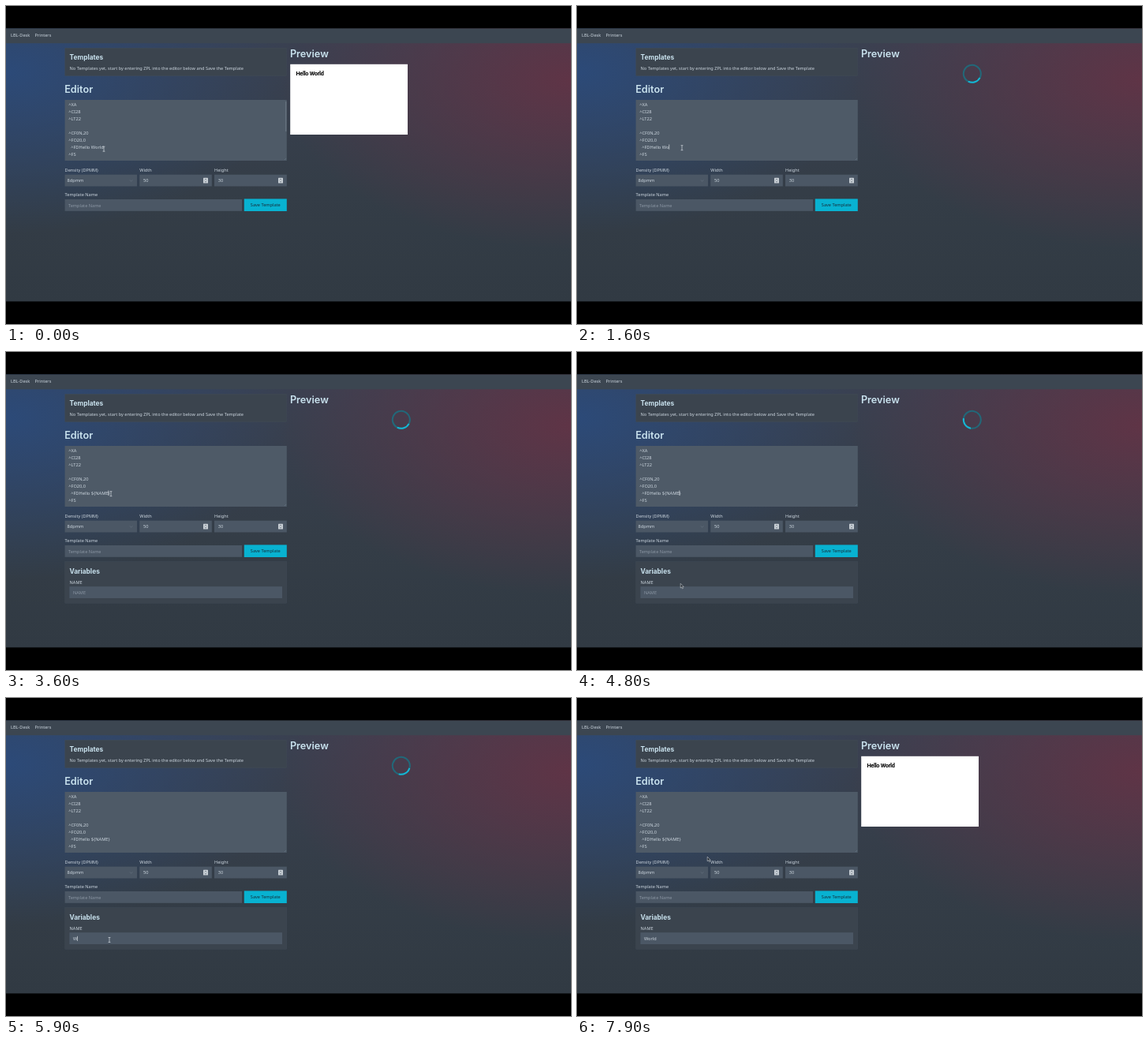
An HTML page that plays this animation: 716x403 px, repeating every 8000 ms.

```html
<!DOCTYPE html>
<html lang="en">
<head>
<meta charset="utf-8">
<title>Label editor</title>
<style>
  html, body { margin: 0; height: 100%; overflow: hidden; background: #000; }
  svg { display: block; width: 100%; height: 100%; }
  text { font: 5.6px "Noto Sans", sans-serif; fill: #cbd5de; white-space: pre; }
  .h1, .h2 { font-family: Inter, sans-serif; font-weight: 600; fill: #c9e2ee; }
  .h1 { font-size: 12.7px; }
  .h2 { font-size: 8.4px; font-weight: 700; }
  .code { font-size: 5.7px; }
  .hint { fill: #8a96a3; }
  .label { font: 700 7.4px Roboto, sans-serif; letter-spacing: -.3px; fill: #000; }
  .field { fill: #4b5765; }
  .card { fill: #3b444e; stroke: #434d58; stroke-width: .4; }
  .line { fill: none; stroke-width: .6; }
</style>
</head>
<body>
<svg viewBox="0 0 716 403">
  <defs>
    <linearGradient id="base" x2="0" y2="1">
      <stop stop-color="#3a4152"/>
      <stop offset=".6" stop-color="#343d47"/>
      <stop offset="1" stop-color="#313a43"/>
    </linearGradient>
    <radialGradient id="blue" gradientUnits="userSpaceOnUse" cx="0" cy="0" r="1"
      gradientTransform="translate(0 55) scale(360 205)">
      <stop stop-color="#2c4a78"/>
      <stop offset="1" stop-color="#2c4a78" stop-opacity="0"/>
    </radialGradient>
    <radialGradient id="red" gradientUnits="userSpaceOnUse" cx="0" cy="0" r="1"
      gradientTransform="translate(716 65) scale(370 215)">
      <stop stop-color="#5f3446"/>
      <stop offset="1" stop-color="#5f3446" stop-opacity="0"/>
    </radialGradient>
    <g id="stepper">
      <rect x="-3" y="-3.4" width="6" height="6.8" rx=".6" fill="#c9d0d6"/>
      <path class="line" stroke="#4b5765" d="M-1.3-.8 0-2 1.3-.8M-1.3.8 0 2 1.3.8"/>
    </g>
  </defs>

  <g transform="translate(0 28.6)">
    <rect width="716" height="345.8" fill="url(#base)"/>
    <rect width="716" height="345.8" fill="url(#blue)"/>
    <rect width="716" height="345.8" fill="url(#red)"/>
    <rect width="716" height="18.6" fill="#3c4651"/>
  </g>
  <text x="6" y="39">LBL-Desk</text>
  <text x="36.6" y="39">Printers</text>

  <rect class="card" x="74.8" y="53.3" width="281" height="35.2"/>
  <text class="h2" x="80.6" y="68.2">Templates</text>
  <text x="80.6" y="80.8">No Templates yet, start by entering ZPL into the editor below and Save the Template</text>

  <text class="h1" x="74.2" y="109.8">Editor</text>
  <rect class="field" x="74.6" y="119" width="281.2" height="77" style="fill:#4e5a67"/>
  <path class="line" stroke="#6d7986" d="M353 195 355 193"/>
  <path id="scrollbar" class="line" stroke="#8893a0" d="M354.8 121V159"/>
  <g id="code"></g>
  <text id="edit" class="code" x="79.2" y="180.5"></text>

  <text x="74.6" y="210">Density (DPMM)</text>
  <text x="169.2" y="210">Width</text>
  <text x="264" y="210">Height</text>
  <rect class="field" x="74.6" y="213.7" width="91.4" height="14.8"/>
  <rect class="field" x="169.2" y="213.7" width="91.6" height="14.8"/>
  <rect class="field" x="264" y="213.7" width="91.8" height="14.8"/>
  <text x="77.6" y="223.2">8dpmm</text>
  <text x="174" y="223.2">50</text>
  <text x="268.8" y="223.2">30</text>
  <path class="line" stroke="#6c7885" d="M156.8 220.5 158.6 222.2 160.4 220.5"/>
  <use href="#stepper" x="253" y="221.2"/>
  <use href="#stepper" x="348" y="221.2"/>

  <text x="74.6" y="241.3">Template Name</text>
  <rect class="field" x="74.6" y="245" width="224.4" height="14.8"/>
  <text class="hint" x="79" y="254.6">Template Name</text>
  <rect x="301.8" y="244.4" width="54" height="15.6" fill="#08b2d1"/>
  <text x="328.8" y="254.3" text-anchor="middle" style="fill:#16303d">Save Template</text>

  <g id="vars">
    <rect class="card" x="74.8" y="265.6" width="281" height="52.6"/>
    <text class="h2" x="80.4" y="280.9">Variables</text>
    <text id="varName" x="80.6" y="293.6"></text>
    <rect class="field" x="80.4" y="297.2" width="269.6" height="14.8"/>
    <text id="value" x="85" y="306.8"></text>
  </g>

  <text class="h1" x="359.9" y="65.3">Preview</text>
  <g id="preview">
    <rect x="360.2" y="73.8" width="148.8" height="89.2" fill="#fff"/>
    <text id="printed" class="label" x="367.4" y="87.8"></text>
  </g>
  <g id="spinner" fill="none" stroke-width="2">
    <circle r="11" stroke="#226879"/>
    <path stroke="#16b6d3" d="M7.78-7.78A11 11 0 0 1 7.78 7.78"/>
  </g>

  <path id="caret" class="line" stroke="#f0f4f7" d="M0-5V1.2"/>
  <path id="beam" class="line" stroke="#e8edf1" d="M-1.4-3H1.4M0-3V3M-1.4 3H1.4"/>
  <path id="arrow" fill="#20272e" stroke="#e8edf1" stroke-width=".5"
    d="M0 0V5.6L1.3 4.4 2.3 6.5 3.2 6.1 2.3 4.1H4Z"/>
</svg>

<script>
const $ = id => document.getElementById(id);
const LOOP = 8000;

['^XA', '^CI28', '^LT22', '', '^CF0N,20', '^FO20,0', '', '^FS'].forEach((s, i) => {
  const line = $('edit').cloneNode();
  line.removeAttribute('id');
  line.setAttribute('y', 126.5 + 9 * i);
  line.textContent = s;
  $('code').append(line);
});

// [time, text before the caret, text after it]
const edits = [
  [200, 'World', ''], [1400, 'Worl', ''], [1500, 'Wor', ''], [1600, 'Wo', ''],
  [1700, 'W', ''], [1800, '', ''], [2000, '$', ''], [2200, '${', ''],
  [2350, '${}', ''], [2700, '${', '}'], [3000, '${N', '}'], [3150, '${NA', '}'],
  [3350, '${NAM', '}'], [3550, '${NAME', '}']
];
const entries = [[5300, ''], [5800, 'W'], [6000, 'Wo'], [6200, 'Wor'], [6400, 'Worl'], [6600, 'World']];

// [start, end, x, y]: the mouse glides to x, y
const moves = [[0, 0, 124, 181.2], [50, 700, 133, 179.7], [4000, 5000, 131, 306.5], [7500, 7900, 165.2, 201.2]];

// [left, top, right, bottom] of the text fields
const fields = [[74, 119, 356, 196], [74, 245, 299, 260], [80, 297, 350, 312]];

const last = (list, t) => list.filter(e => e[0] <= t).pop() || list[0];
const show = (id, on) => $(id).setAttribute('visibility', on ? 'visible' : 'hidden');
const place = (id, x, y, turn = 0) => $(id).setAttribute('transform', `translate(${x} ${y}) rotate(${turn})`);

function mouseAt(t) {
  let x = 0, y = 0;
  for (const [a, b, tx, ty] of moves) {
    const p = Math.min(1, Math.max(0, (t - a) / (b - a || 1)));
    const k = a === b ? 1 : p * p * (3 - 2 * p);
    x += (tx - x) * k;
    y += (ty - y) * k;
  }
  return [x, y];
}

function draw(t) {
  const [editTime, before, after] = last(edits, t);
  const [entryTime, value] = last(entries, t);
  const head = '  ^FDHello ' + before;
  $('edit').textContent = head + after;
  $('varName').textContent = before.slice(2);
  $('value').textContent = value || before.slice(2);
  $('value').classList.toggle('hint', !value);
  show('vars', t >= 3000);
  show('scrollbar', t < 1500);

  const inForm = t >= entryTime;
  const since = t - (inForm ? entryTime : editTime);
  const node = $(inForm ? 'value' : 'edit');
  const count = inForm ? value.length : head.length;
  const width = count ? node.getSubStringLength(0, count) : 0;
  show('caret', since >= 0 && t < 7600 && Math.floor(since / 500) % 2 === 0);
  place('caret', +node.getAttribute('x') + width + .3, +node.getAttribute('y'));

  const first = t >= 1400 && t < 5000;
  const busy = first || t >= 5800 && t < 7400;
  show('preview', !busy);
  show('spinner', busy);
  place('spinner', 500.8, 85.8, first ? (t - 2400) * .36 : (t - 6800) * .36 + 25);
  $('printed').textContent = t >= 5000 && t < 7400 ? 'Hello ${NAME}' : 'Hello World';

  const [x, y] = mouseAt(t);
  const overField = fields.some(([l, u, r, d]) => x > l && x < r && y > u && y < d);
  show('beam', overField);
  show('arrow', !overField);
  place('beam', x, y);
  place('arrow', x, y);
}

const start = performance.now();
function tick() {
  draw((performance.now() - start) % LOOP);
  requestAnimationFrame(tick);
}
tick();
</script>
</body>
</html>
```
